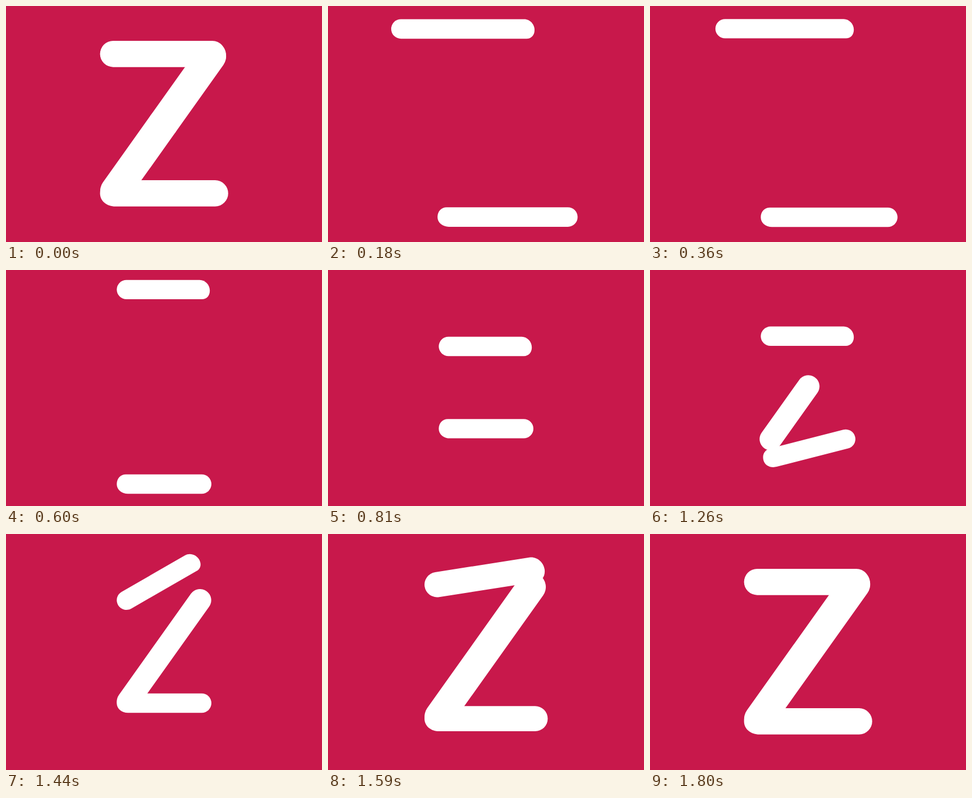
Recreate the animation shown at these times as an HTML page. Size 560 px wide and 420 px high, loop 2160 ms.

```html
<!DOCTYPE html>
<html lang="en">
<head>
<meta charset="utf-8">
<title>Letter Z</title>
<style>
  html, body { margin: 0; width: 100%; height: 100%; overflow: hidden; background: #c8184b; }
  svg { display: block; width: 560px; height: 420px; }
  line { stroke: #fff; stroke-linecap: round; }
</style>
</head>
<body>
<svg viewBox="0 0 560 420" fill="#fff">
  <g id="letter">
    <path id="top"/>
    <path id="bottom"/>
    <line id="lower"/>
    <line id="upper"/>
  </g>
</svg>
<script>
const LOOP = 2160, STEP = 30;
const BIG = 1.354, CX = 280, CY = 209.5;
const HALF = 17.2;
const REST = { top: 117.8, bottom: 301 };
const DIAG = { x: 216.2, y: 297.9, dx: 125.4, dy: -176.9 };

const smooth = p => 0.5 - 0.5 * Math.cos(Math.PI * p);
const out = p => Math.sin(p * Math.PI / 2);
const settle = p => 1 - Math.pow(1 - p, 2.25);

// Each key is [time, value, easing towards this key].
const tracks = {
  scale: [[0, BIG], [200, 1], [1440, 1], [1640, BIG]],
  topY: [[0, REST.top], [200, 40.4], [570, 40.4], [630, 29.3], [810, 136], [960, REST.top]],
  bottomY: [[0, REST.bottom], [200, 376], [570, 376], [630, 386], [810, 282.4], [960, REST.bottom]],
  topLeft: [[20, 196.3], [270, 80], [510, 196.3]],
  topRight: [[0, 361.2], [180, 365.3], [300, 361.2]],
  bottomLeft: [[0, 196.3], [180, 194.8], [300, 196.3]],
  bottomRight: [[20, 364], [270, 472], [510, 364]],
  topTilt: [[1340, 0], [1440, -30, out], [1800, 0, settle]],
  bottomTilt: [[1020, 0], [1150, -24.3, out], [1400, 0]],
  split: [[0, 0], [150, 1]],
  radius: [[990, 0], [1065, 19.8, out]],
  from: [[1300, -0.0175], [1430, 0]],
  to: [[1095, -0.0175], [1420, 1.019], [1560, 1]]
};

function at(name, t) {
  const keys = tracks[name];
  if (t <= keys[0][0]) return keys[0][1];
  for (let i = 1; i < keys.length; i++) {
    const [t0, v0] = keys[i - 1];
    const [t1, v1, ease = smooth] = keys[i];
    if (t < t1) return v0 + (v1 - v0) * ease((t - t0) / (t1 - t0));
  }
  return keys[keys.length - 1][1];
}

const el = id => document.getElementById(id);
const set = (id, attrs) => {
  for (const key in attrs) el(id).setAttribute(key, attrs[key]);
};

function topPath(l, r, y) {
  const a = y - HALF, b = y + HALF;
  return `M${l + HALF} ${a}H${r - 18}C${r - 8} ${a} ${r} ${a + 9} ${r} ${a + 19}` +
    `C${r} ${b - 6} ${r - 6} ${b} ${r - 14} ${b}H${l + HALF}A${HALF} ${HALF} 0 0 1 ${l + HALF} ${a}Z`;
}

function bottomPath(l, r, y) {
  const a = y - HALF, b = y + HALF;
  return `M${r - HALF} ${a}A${HALF} ${HALF} 0 0 1 ${r - HALF} ${b}H${l + 20}` +
    `C${l + 9} ${b} ${l} ${b - 7} ${l} ${y}C${l} ${a + 7} ${l + 7} ${a} ${l + 16} ${a}Z`;
}

// Part of the diagonal between two fractions of its length.
function stroke(id, u0, u1, radius, shift) {
  set(id, {
    x1: DIAG.x + DIAG.dx * u0, y1: DIAG.y + DIAG.dy * u0 + shift,
    x2: DIAG.x + DIAG.dx * u1 + 0.01, y2: DIAG.y + DIAG.dy * u1 + shift,
    "stroke-width": 2 * radius
  });
}

function draw(t) {
  const v = {};
  for (const name in tracks) v[name] = at(name, t);

  set("letter", {
    transform: `translate(${CX} ${CY}) scale(${v.scale}) translate(${-CX} ${-CY})`
  });
  set("top", {
    d: topPath(v.topLeft, v.topRight, v.topY),
    transform: `rotate(${v.topTilt} 213.5 ${REST.top})`
  });
  set("bottom", {
    d: bottomPath(v.bottomLeft, v.bottomRight, v.bottomY),
    transform: `rotate(${v.bottomTilt} 346.5 ${REST.bottom})`
  });

  if (v.split < 1) {
    const len = 0.5 * (1 - v.split);
    const radius = 19.7 - 7 * Math.pow(v.split, 4);
    stroke("lower", 0, len, radius, v.bottomY - REST.bottom);
    stroke("upper", 1, 1 - len, radius, v.topY - REST.top);
  } else {
    stroke("lower", v.from, v.to, v.radius, 0);
    stroke("upper", 1, 1, 0, 0);
  }
}

const start = performance.now();
function tick() {
  const t = (performance.now() - start) % LOOP;
  draw(Math.floor(t / STEP) * STEP);
  requestAnimationFrame(tick);
}
tick();
</script>
</body>
</html>
```
